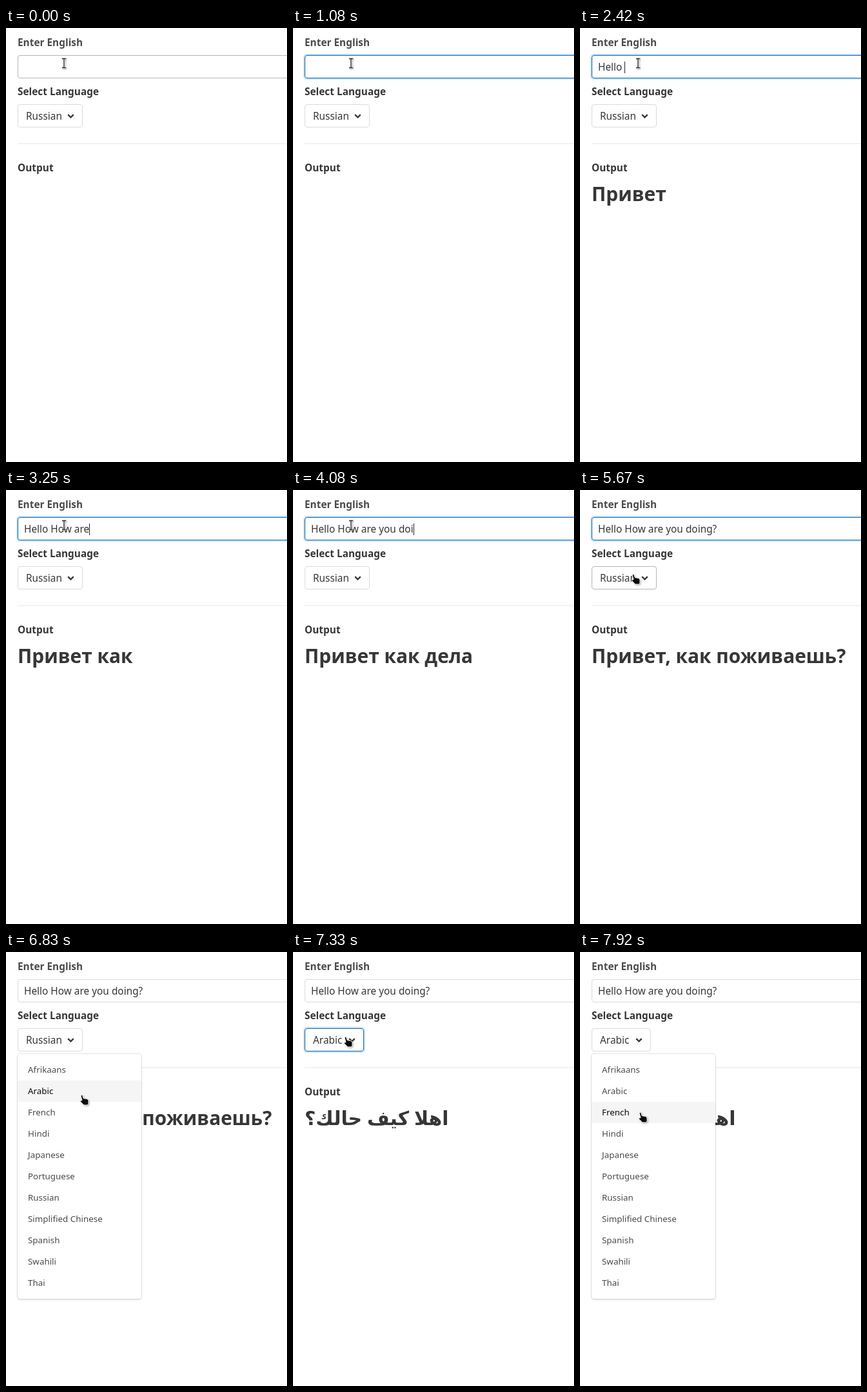
Write an HTML page that moves like this. It is 436 by 672 pixels and loops after 8 s.

```html
<!DOCTYPE html>
<html lang="en">
<head>
<meta charset="utf-8">
<style>
html, body { margin: 0; width: 100%; height: 100%; overflow: hidden; background: #fff; }
body { position: relative; font: 15.4px "Noto Sans", "DejaVu Sans", sans-serif; color: #363636; }
body * { position: absolute; box-sizing: border-box; white-space: pre; }
.label { left: 18px; line-height: 24px; font-weight: bold; }
.box { left: 18px; height: 36px; border: 1px solid #dbdbdb; border-radius: 4px; line-height: 34px; }
.hover { border-color: #b5b5b5; }
.focus { border-color: #1268b0; box-shadow: 0 0 0 2px rgba(20, 130, 220, .25); }
#input { top: 42px; width: 460px; }
#typed { left: 9px; top: 1px; }
#caret { top: 9px; width: 1px; height: 18px; background: #222; }
#button { top: 118px; }
#lang { left: 12px; top: 1px; }
#chevron { right: 12px; top: 14px; }
#rule { left: 18px; right: 0; top: 178px; height: 2px; background: #f3f3f3; }
#output { left: 18px; top: 237px; font-size: 29.9px; line-height: 40px; font-weight: bold; }
#menu { left: 18px; top: 158px; width: 192px; height: 379px; background: #fff; border-radius: 4px;
  box-shadow: 0 2px 3px rgba(10, 10, 10, .1), 0 0 0 1px rgba(10, 10, 10, .1); }
.item { left: 0; width: 192px; height: 33px; padding-left: 16px; font-size: 13.4px; line-height: 33px; color: #4a4a4a; }
.item.on { background: #f5f5f5; color: #0a0a0a; }
.pointer { left: 0; top: 0; overflow: visible; filter: drop-shadow(1px 1px 1px rgba(0, 0, 0, .35)); }
</style>
</head>
<body>
<div class="label" style="top:11px;color:#4a4a4a">Enter English</div>
<div id="input" class="box"><span id="typed"></span><div id="caret"></div></div>
<div class="label" style="top:87px">Select Language</div>
<div id="button" class="box"><span id="lang"></span>
  <svg id="chevron" width="11" height="7"><path d="M1.2 1.2L5.5 5.3L9.8 1.2" fill="none" stroke="#363636" stroke-width="2.3"/></svg>
</div>
<div id="rule"></div>
<div class="label" style="top:205px">Output</div>
<div id="output"></div>
<div id="menu"></div>
<svg id="beam" class="pointer" width="1" height="1">
  <g fill="none"><path d="M-3 -7.5H3M0 -7.5V6.5M-3 6.5H3" stroke="#fff" stroke-width="3"/>
  <path d="M-3 -7.5H3M0 -7.5V6.5M-3 6.5H3" stroke="#222" stroke-width="1.3"/></g>
</svg>
<svg id="hand" class="pointer" width="1" height="1">
  <path d="M0 1C.8 0 2.6 .2 3 1.8L4.2 5.6L9.5 6.4Q12 7 12 9.5V13.5Q11.8 16 10 16H5Q3.6 15.6 2.6 13.6L-.6 10.8Q-1.2 8.8 .8 8.8L2 9Z" fill="#0a0a0a" stroke="#fff" stroke-width="1"/>
</svg>
<script>
const TICK = 1000 / 12, TICKS = 96;
const $ = id => document.getElementById(id);

const phrase = "Hello How are you doing?";
const keyTicks = [18, 19, 20, 23, 25, 29, 32, 34, 35, 36, 37, 38, 39, 40, 42, 43, 45, 46, 47, 48, 49, 50, 51, 58];
const outputs = [
  [0, ""], [19, "Он"], [20, "Хел"], [24, "Ад"], [27, "Привет"], [33, "Привет Н"], [35, "Привет Хо"],
  [36, "Привет как"], [40, "Привет, как дела"], [43, "Привет, как дела?"], [47, "Привет как дела"],
  [54, "Привет, как поживаешь"], [59, "Привет, как поживаешь?"], [86, "اهلا كيف حالك؟"]
];
const path = [
  [0, 90, 55], [63, 90, 55], [65, 86, 75], [68, 81, 130], [71, 81, 130], [78, 116, 221],
  [84, 116, 221], [88, 80, 131], [89, 80, 131], [91, 90, 213], [93, 92, 248], [96, 92, 248]
];
const items = ["Afrikaans", "Arabic", "French", "Hindi", "Japanese", "Portuguese", "Russian",
  "Simplified Chinese", "Spanish", "Swahili", "Thai"].map((name, i) => {
  const el = document.createElement("div");
  el.className = "item";
  el.textContent = name;
  el.style.top = 8 + 33 * i + "px";
  $("menu").append(el);
  return el;
});

const within = (n, from, to) => n >= from && n < to;
const show = (id, on) => $(id).style.display = on ? "" : "none";
const setBox = (id, focus, hover) => $(id).className = "box" + (focus ? " focus" : hover ? " hover" : "");

function pointerAt(n) {
  const i = path.findIndex(p => p[0] > n);
  const [t0, x0, y0] = path[i - 1], [t1, x1, y1] = path[i];
  const k = (n - t0) / (t1 - t0);
  return [x0 + (x1 - x0) * k, y0 + (y1 - y0) * k];
}

function draw(n) {
  const [x, y] = pointerAt(n);
  const open = within(n, 71, 83) || n >= 89;
  const overButton = x < 119 && within(y, 118, 154);
  const useHand = overButton || (open && y > 118);

  $("typed").textContent = phrase.slice(0, keyTicks.filter(k => k <= n).length);
  $("caret").style.left = 9 + $("typed").offsetWidth + "px";
  show("caret", within(n, 6, 13) || within(n, 18, 64));
  setBox("input", within(n, 6, 70), n < 6);

  const arabic = n >= 83;
  $("lang").textContent = arabic ? "Arabic" : "Russian";
  $("button").style.width = (arabic ? 92 : 101) + "px";
  setBox("button", within(n, 70, 82) || within(n, 88, 95), overButton);

  $("output").textContent = outputs.filter(o => o[0] <= n).pop()[1];
  show("menu", open);
  items.forEach((el, i) => el.classList.toggle("on", i === Math.floor((y - 166) / 33)));

  show("hand", useHand);
  show("beam", !useHand);
  $(useHand ? "hand" : "beam").style.transform = `translate(${x}px, ${y}px)`;
}

function loop(now) {
  draw(Math.floor((now + 4) / TICK) % TICKS);
  requestAnimationFrame(loop);
}
draw(0);
requestAnimationFrame(loop);
</script>
</body>
</html>
```
